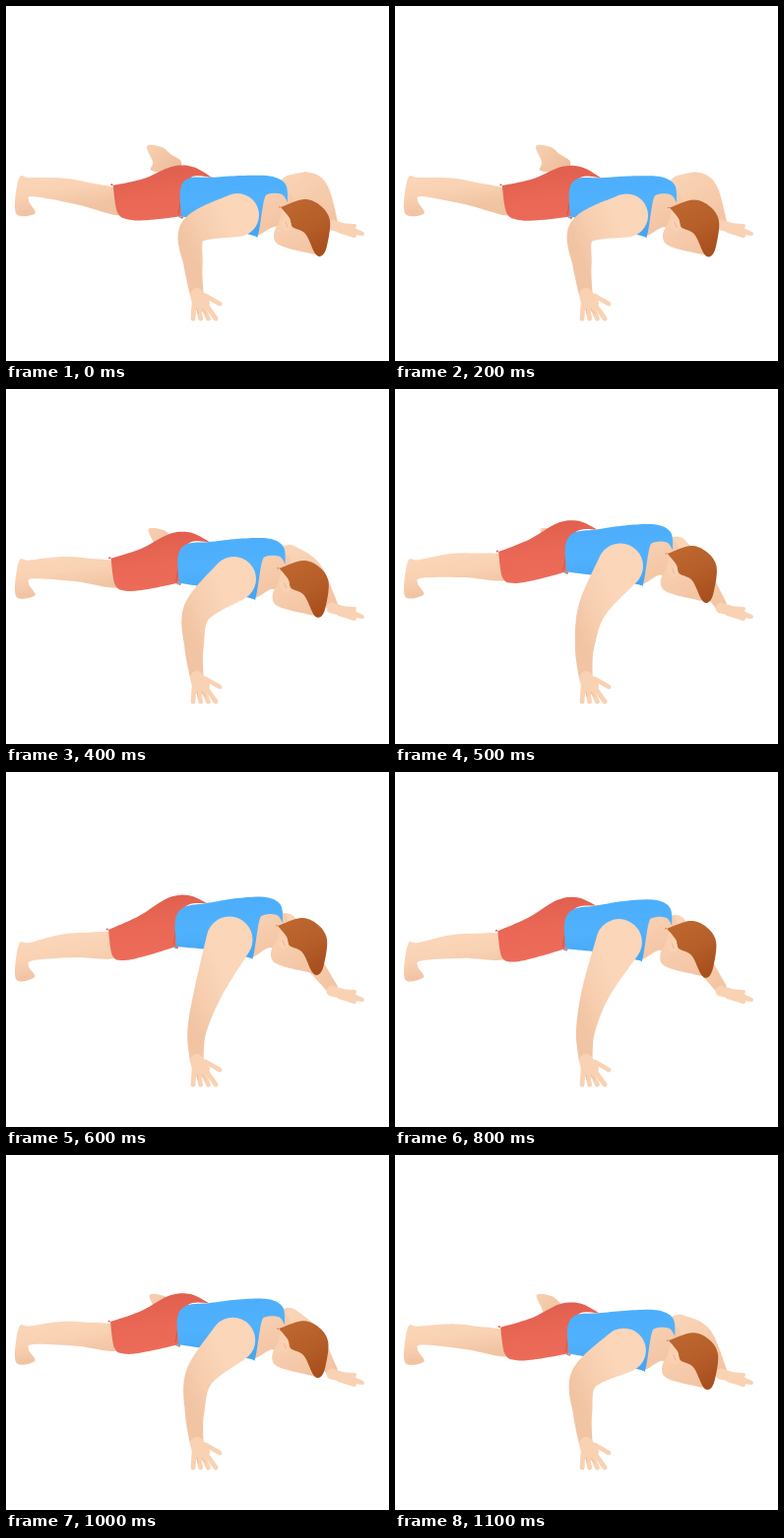
An HTML page with a canvas that plays this animation: 389 px wide and 360 px high, repeating every 1.2 s.

```html
<!DOCTYPE html>
<html lang="en">
<head>
<meta charset="utf-8">
<title>Push-up</title>
<style>
  html, body { margin: 0; width: 100%; height: 100%; overflow: hidden; background: #fff; }
  canvas { display: block; width: 389px; height: 360px; }
</style>
</head>
<body>
<canvas id="stage" width="389" height="360"></canvas>
<script>
const ctx = document.getElementById('stage').getContext('2d');
const STEP = 100;
// Depth of the push-up per step: 0 = arms straight, 1 = chest low
const depths = [1, 1.04, 1.01, .79, .54, .23, 0, -.04, .06, .22, .42, .67];
const SKIN = '#f9d2b3', CREASE = '#e8b897';

// Key points with straight arms; a doubled point makes a corner
const parse = s => s.split(' ').map(p => p.split(',').map(Number));
const farFoot = parse('143,142 158,143 167,150 178,158 172,168 148,167 149,158');
const leg = parse('13,175 24,173 55,165 78,163 112,164 112,188 70,188 28,191 23,197 29,208 10,210');
const shorts = parse('104,160 104,160 135,146 164,128 185,125 204,133 204,133 181,138 173,177 173,177 140,187 119,191 108,186');
const chest = parse('252,143 280,142 287,156 280,186 268,178 246,187');
const shirt = parse('173,177 173,177 172,150 181,137 204,133 235,128 264,127 279,135 281,153 281,153 275,145 262,145 257,152 251,187 246,188 206,180 206,180');
const face = parse('283,159 274,172 269,184 274,194 298,201 313,200');
const hair = parse('276,156 276,156 300,148 317,155 326,170 323,195 318,205 311,203 301,183 288,176 285,167');

const lerp = (a, b, t) => a + (b - a) * t;

// The planted foot stays, the body sinks more towards the shoulders
function sag([x, y], p) {
  const u = Math.max(0, Math.min(1, (x - 20) / 265));
  return [x + 5 * p * Math.min(1, 3 * u), y + 46 * p * Math.sin(u * Math.PI / 2)];
}

// Point of a Catmull-Rom curve between b and c
const curve = (a, b, c, d, t) => b.map((v, k) =>
  v + t / 2 * (c[k] - a[k] + t * (2 * a[k] - 5 * v + 4 * c[k] - d[k] + t * (3 * (v - c[k]) + d[k] - a[k]))));

function fill(pts, style) {
  const n = pts.length;
  ctx.beginPath();
  pts.forEach((_, i) => {
    const near = [-1, 0, 1, 2].map(k => pts[(i + k + n) % n]);
    for (let t = 0; t < 1; t += .1) ctx.lineTo(...curve(...near, t));
  });
  ctx.fillStyle = style;
  ctx.fill();
}

// Tapered limb through joints [x, y, radius]
function limb(joints, style) {
  const last = joints.length - 1;
  const at = i => joints[Math.max(0, Math.min(last, i))];
  ctx.beginPath();
  for (let i = 0; i < last; i++) {
    for (let t = 0; t <= 1; t += .03) {
      const [x, y, r] = curve(at(i - 1), at(i), at(i + 1), at(i + 2), t);
      ctx.moveTo(x + r, y);
      ctx.arc(x, y, r, 0, 7);
    }
  }
  ctx.fillStyle = style;
  ctx.fill();
}

function stroke(color, width, x0, y0, x1, y1) {
  ctx.beginPath();
  ctx.moveTo(x0, y0);
  ctx.lineTo(x1, y1);
  ctx.strokeStyle = color;
  ctx.lineWidth = width;
  ctx.stroke();
}

function blend(x0, y0, x1, y1, ...colors) {
  const g = ctx.createLinearGradient(x0, y0, x1, y1);
  colors.forEach((c, i) => g.addColorStop(i / (colors.length - 1), c));
  return g;
}

function drawFarArm(p) {
  const shoulder = [lerp(284, 291, p), lerp(155, 185, p), lerp(12, 14, p)];
  const elbow = [lerp(306, 313, p), 185, lerp(10, 13, p)];
  limb([shoulder, elbow, [331, 219, 6]], blend(290, 165, 330, 220, '#fad4b6', '#f3c4a3'));
  limb([[331, 222, 5.5], [345, 226, 4.5], [362, 231, 2]], SKIN);
  for (let i = 0; i < 2; i++) stroke(SKIN, 4, 338, 222 + 6 * i, 354, 223 + 10 * i);
}

function drawNearArm(p) {
  const bend = Math.sin(Math.min(1, p) * Math.PI / 2);
  const shoulder = [lerp(227, 235, p), lerp(170, 212, p), lerp(23.5, 22, p)];
  const elbow = [lerp(206, 191, bend), lerp(221, 227, p), 14.5];
  const forearm = [lerp(194, 190, bend), 262, 9.7];
  limb([shoulder, elbow, forearm, [193.5, 291, 7]],
    blend(180, 235, 225, 215, '#f1c4a3', '#f7cfb0', '#fbd6b9'));

  limb([[194, 293, 7], [198, 301, 9]], SKIN);
  for (let i = 0; i < 4; i++) stroke(SKIN, 4.8, 191 + 4 * i, 303, 190 + 7.7 * i, 317);
  stroke(SKIN, 4.8, 203, 294, 217, 302);
  for (let i = 0; i < 2; i++) stroke(CREASE, .8, 194 + 5 * i, 307, 195 + 8 * i, 312);
}

function drawHead(p) {
  ctx.save();
  ctx.translate(3 * p, 48 * p);
  fill(face, blend(278, 167, 300, 202, '#f8d0b0', '#f3c5a5'));
  fill(hair, blend(290, 150, 318, 204, '#bd662f', '#b55e29', '#a64e1c'));
  ctx.beginPath();
  ctx.ellipse(281.5, 173.5, 5, 6.5, -.25, 0, 7);
  ctx.fillStyle = SKIN;
  ctx.fill();
  stroke(CREASE, 1, 281, 171, 283, 176);
  ctx.restore();
}

function draw(p) {
  const drop = 40 * p;
  const body = pts => pts.map(q => sag(q, p));
  ctx.clearRect(0, 0, 389, 360);
  ctx.lineCap = 'round';

  // The far foot slips behind the hips as they rise
  fill(farFoot.map(([x, y]) => [x + 8 * (1 - p) ** 2, y]), blend(145, 142, 170, 168, '#f7d0b1', '#edbd9b'));
  drawFarArm(p);

  fill(body(leg), blend(50, 165, 56, 207, '#fbd6b9', '#f9d2b3', '#f0c3a2'));
  for (let x = 14; x < 24; x += 4) stroke(CREASE, .7, x, 207, x + 1, 209);

  const hips = body(shorts);
  fill(hips, blend(145, 130 + drop, 152, 185 + drop, '#e2604f', '#ea6855', '#ec6c59'));
  stroke('#d45a4a', 1.2, hips[7][0] - 5, hips[7][1] + 4, hips[8][0] - 3, hips[8][1] - 2);

  fill(body(chest), blend(262, 145 + drop, 282, 185 + drop, '#f8d0b1', '#f2c3a2'));
  fill(body(shirt), blend(220, 127 + drop, 224, 190 + drop, '#4caefb', '#50b2fe', '#46a5f3'));
  drawNearArm(p);
  drawHead(p);
}

let shown = -1;
const start = performance.now();
function tick(now) {
  const step = Math.floor(Math.max(0, now - start) / STEP) % depths.length;
  if (step !== shown) draw(depths[shown = step]);
  requestAnimationFrame(tick);
}
tick(start);
</script>
</body>
</html>
```
